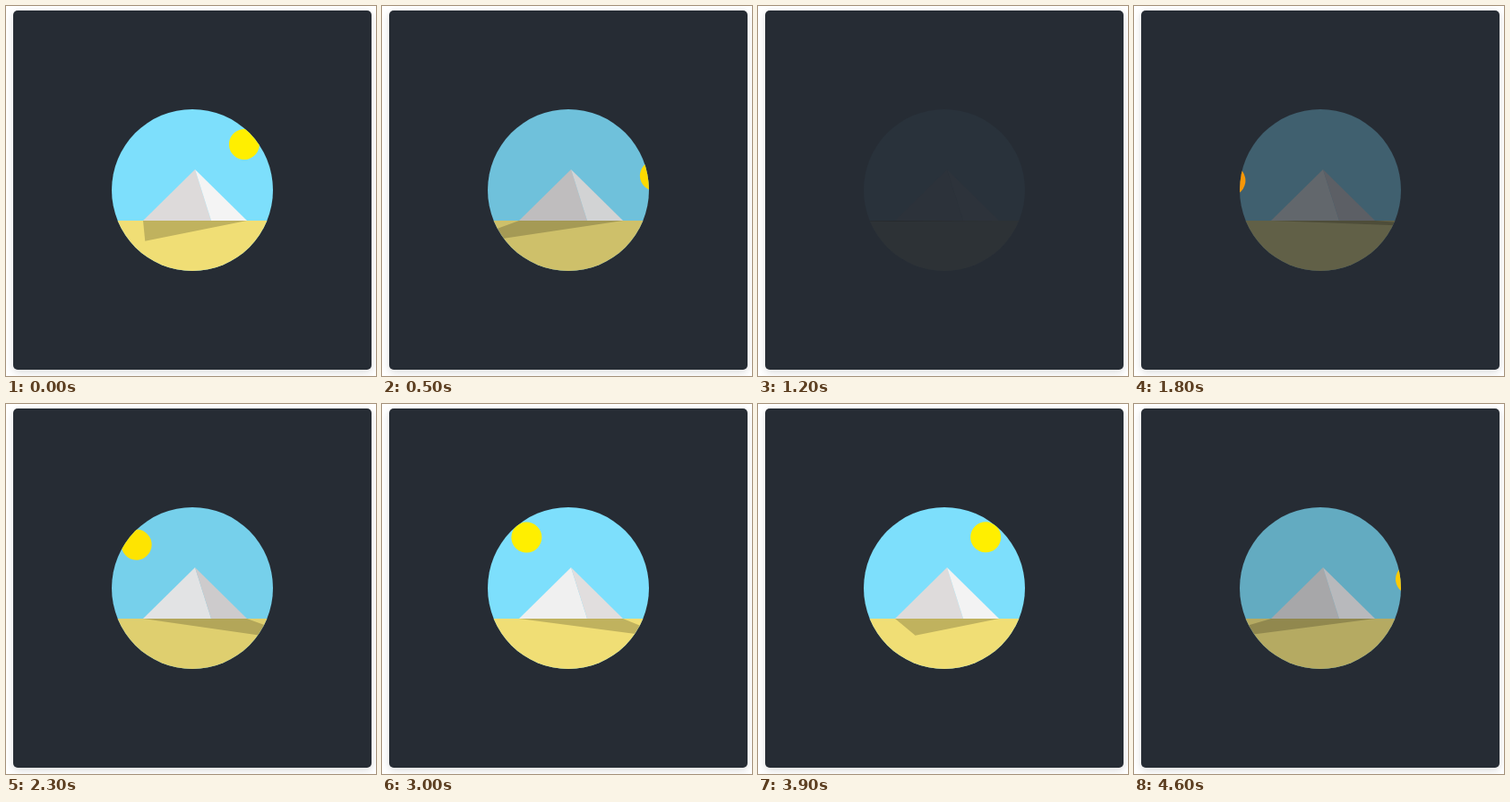
An HTML page for the animation above (4.7 s loop, 413 by 412 pixels).

```html
<!DOCTYPE html>
<html lang="en">
<head>
<meta charset="utf-8">
<title>Pyramid day</title>
<style>
  html, body { margin: 0; width: 100%; height: 100%; overflow: hidden; background: #fff; }
  .card {
    position: absolute; left: 8px; top: 5px; width: 400px; height: 400px;
    border-radius: 5px; background: #262c34;
    box-shadow: 0 3px 9px rgba(0, 0, 0, .14);
  }
  svg { position: absolute; left: 110px; top: 110px; width: 180px; height: 180px; }
</style>
</head>
<body>
<div class="card">
  <svg viewBox="0 0 180 180">
    <clipPath id="disc"><circle cx="90" cy="90" r="90"/></clipPath>
    <g clip-path="url(#disc)">
      <rect id="sky" width="180" height="180"/>
      <circle id="sun" cx="90" cy="24" r="17"/>
      <rect id="sand" y="124" width="180" height="56"/>
      <polygon id="left" points="93,67 35,124 111,124"/>
      <polygon id="right" points="93,67 111,124 151,124"/>
      <polygon id="shadow" fill="#000" fill-opacity=".2"/>
    </g>
  </svg>
</div>
<script>
  const LOOP = 4700, STEP = 100, DAY = 4000, START = 2613;
  const NIGHT = [38, 44, 52];
  const part = id => document.getElementById(id);

  // Each track lists [percent of the day, value].
  const dayColor = (morning, evening = morning, night = NIGHT) =>
    [[0, night], [30, morning], [70, evening], [100, night]];
  const YELLOW = [255, 239, 0], ORANGE = [245, 114, 9];
  const LIGHT = [244, 244, 244], SHADE = [221, 218, 218];
  const colors = {
    sky: dayColor([125, 223, 252]),
    sand: dayColor([240, 222, 117]),
    sun: dayColor(YELLOW, YELLOW, ORANGE),
    left: dayColor(LIGHT, SHADE),
    right: dayColor(SHADE, LIGHT)
  };
  const sunAngle = [[0, [-70]], [30, [-28]], [100, [70]]];
  const tipX = [[0, [280]], [30, [222]], [100, [-95]]];
  const tipDrop = [[0, [0]], [30, [30]], [55, [12]], [75, [30]], [100, [0]]];

  // cubic-bezier(.4, 0, .49, 1)
  function ease(x) {
    let lo = 0, hi = 1;
    for (let i = 0; i < 24; i++) {
      const s = (lo + hi) / 2, r = 1 - s;
      if (1.2 * s * r * r + 1.47 * s * s * r + s * s * s < x) lo = s; else hi = s;
    }
    return lo * lo * (3 - 2 * lo);
  }

  function sample(track, pct) {
    let i = 1;
    while (i < track.length - 1 && pct > track[i][0]) i++;
    const [p0, a] = track[i - 1], [p1, b] = track[i];
    const k = ease((pct - p0) / (p1 - p0));
    return a.map((v, j) => v + (b[j] - v) * k);
  }

  function draw(time) {
    const pct = (time + START) % DAY / DAY * 100;
    for (const id in colors) {
      part(id).setAttribute('fill', `rgb(${sample(colors[id], pct).map(Math.round)})`);
    }
    part('sun').setAttribute('transform', `rotate(${sample(sunAngle, pct)[0]} 90 143)`);
    const x = sample(tipX, pct)[0], y = 124 + sample(tipDrop, pct)[0];
    part('shadow').setAttribute('points', `35,124 151,124 ${x},${y}`);
  }

  const begin = performance.now();
  function tick() {
    const time = (performance.now() - begin) % LOOP;
    draw(Math.floor(time / STEP) * STEP);
    requestAnimationFrame(tick);
  }
  tick();
</script>
</body>
</html>
```
